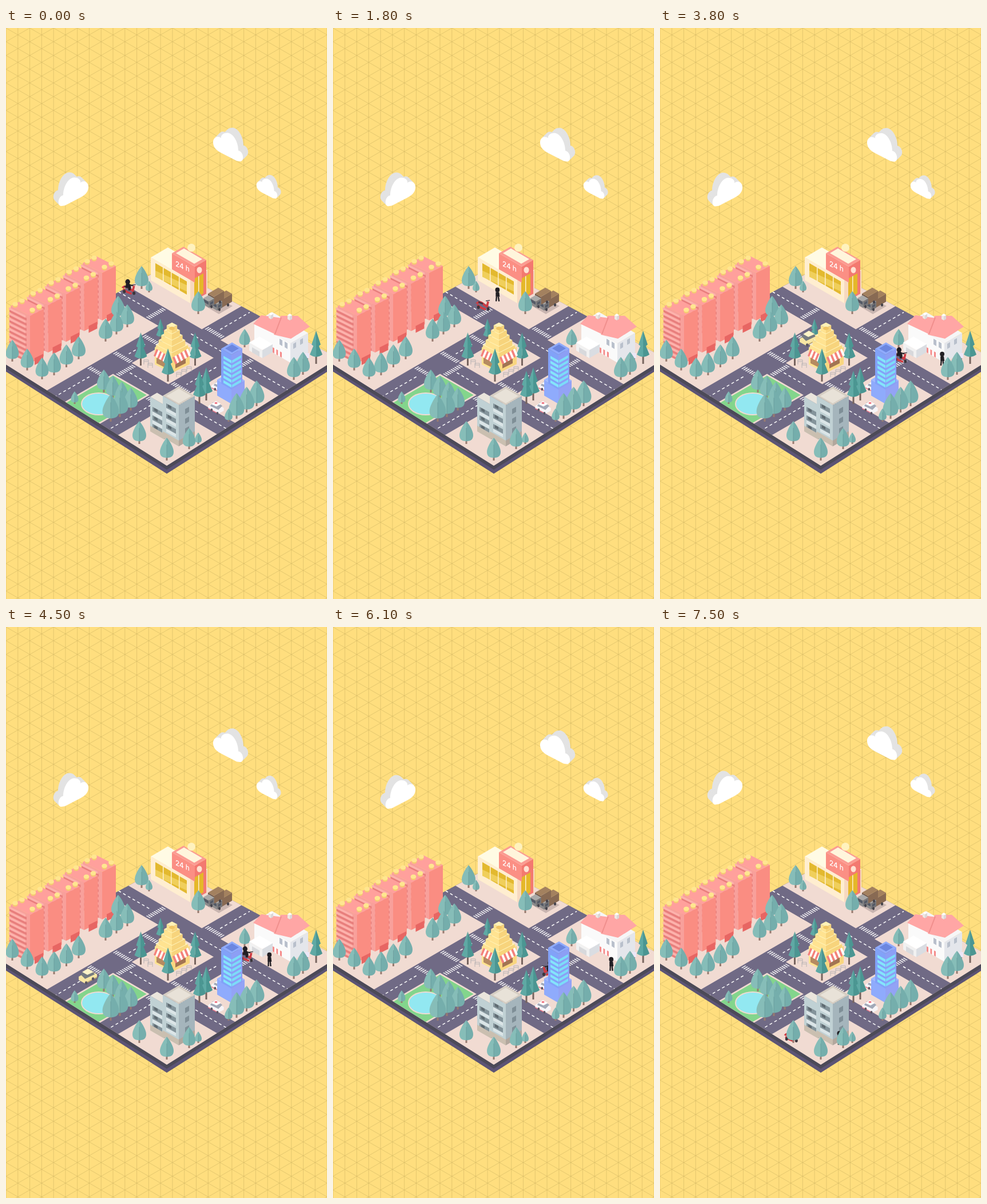
Recreate the animation shown at these times as an HTML page. Size 561 by 998 pixels, loop 7.6 s.

```html
<!DOCTYPE html>
<html lang="en">
<head>
<meta charset="utf-8">
<title>Isometric town</title>
<style>
html, body { margin: 0; width: 100%; height: 100%; overflow: hidden; background: #ffde7e; }
svg { display: block; width: 561px; height: 998px; }
</style>
</head>
<body>
<svg id="stage" viewBox="0 0 561 998" xmlns="http://www.w3.org/2000/svg"></svg>
<script>
const LOOP = 7600, STEP = 100, K = .58;
const stage = document.getElementById('stage');

// ---- shape helpers -------------------------------------------------
const poly = (fill, pts) => `<polygon fill="${fill}" points="${pts}"/>`;
const path = (d, fill, stroke = 'none', w = 1) => `<path d="${d}" fill="${fill}" stroke="${stroke}" stroke-width="${w}"/>`;
const oval = (x, y, rx, ry, fill) => `<ellipse cx="${x}" cy="${y}" rx="${rx}" ry="${ry}" fill="${fill}"/>`;
const rep = (n, f) => Array.from({ length: n }, (_, i) => f(i)).join('');
// Upright panel: top corner, horizontal run, slope, height
const wall = (x, y, run, slope, h, fill) =>
  poly(fill, [[x, y], [x + run, y + run * slope], [x + run, y + run * slope + h], [x, y + h]]);
// Solid block given by its front bottom corner
const box = (x, y, w, d, h, top, left, right, k = K) =>
  wall(x - w, y - h - w * k, w, k, h, left) + wall(x, y - h, d, -k, h, right) +
  poly(top, [[x, y - h], [x - w, y - h - w * k], [x - w + d, y - h - (w + d) * k], [x + d, y - h - d * k]]);

// Ground coordinates: a is constant along NW-SE, b along SW-NE
const pt = (a, b) => [(b - a) / (2 * K), (a + b) / 2];
const tile = (a0, a1, b0, b1, fill) => poly(fill, [pt(a0, b0), pt(a0, b1), pt(a1, b1), pt(a1, b0)]);

// ---- ground --------------------------------------------------------
// Road centre lines and half width
const R1 = 347, R2 = 477, S1 = 694, S2 = 806, NE = 744, HALF = 19;
const FAR = 1100;

function grid() {
  const rise = 12, run = 20.78;
  let d = '';
  for (let x = 0; x < 562; x += run) d += `M${x.toFixed(2)},0V998`;
  for (let y = -14 * 2 * rise; y < 1330; y += 2 * rise) d += `M0,${y}l${27 * run},${27 * rise}M0,${y}l${27 * run},${-27 * rise}`;
  return path(d, 'none', '#d8bd68', .7);
}

const lane = (a0, b0, a1, b1) =>
  `<path d="M${pt(a0, b0)}L${pt(a1, b1)}" stroke="#fff" stroke-width="1.5" stroke-dasharray="5 4.5" fill="none"/>`;

// Zebra stripes across a road at ground point (a, b)
const zebra = (a, b, da, db) => rep(9, i => {
  const s = (i - 4) * 3.8;
  const ca = a + s * da, cb = b + s * db, wa = da ? .9 : 4, wb = db ? .9 : 4;
  return tile(ca - wa, ca + wa, cb - wb, cb + wb, '#f4f2f4');
});
const zebraR = (a, b) => zebra(a, b, 1, 0);
const zebraS = (a, b) => zebra(a, b, 0, 1);

function ground() {
  const rim = (drop, fill) => poly(fill, [[-18, 577], [281, 765 + drop], [580, 577], [580, 577 + drop], [281, 765 + drop + 7], [-18, 577 + drop]]);
  const block = (a0, a1, b0, b1, fill = '#f1dbd2') =>
    tile(a0 + HALF, a1 - HALF, b0 + HALF, b1 - HALF, fill);
  return poly('#5c5475', '-18,577 281,765 580,577 580,589 281,779 -18,589') +
    poly('#4c4a58', '-18,577 281,765 580,577 580,584 281,772 -18,584') +
    '<clipPath id="land"><path d="M281,416L580,577L281,765L-18,577Z"/></clipPath><g clip-path="url(#land)">' +
    '<rect y="400" width="561" height="380" fill="#706a85"/>' +
    block(0, R1, 0, NE) + block(0, R1, NE, FAR) + block(R1, FAR, 0, S1) +
    block(R1, R2, S1, S2) + block(R1, R2, S2, FAR) +
    block(R2, FAR, S1, S2) + block(R2 + 3, FAR, S1 + 3, S2 - 3, '#83d58c') + block(R2, FAR, S2, FAR) +
    lane(R1, 575, R1, 638) + lane(R1, 722, R1, 812) + lane(R1, 840, R1, 930) +
    lane(310, NE, 250, NE) + lane(412, S1, 445, S1) + lane(525, S1, 610, S1) +
    lane(380, S2, 440, S2) + lane(512, S2, 610, S2) + lane(R2, 728, R2, 775) + lane(R2, 842, R2, 930) +
    zebraR(R1, 651) + zebraR(R1, 829) + zebraR(R2, 720) + zebraR(R2, 832) +
    zebraS(398, S1) + zebraS(457, S1) + zebraS(509, S1) + zebraS(321, NE) + zebraS(452, S2) + zebraS(503, S2) +
    oval(162, 657, 31, 20, '#f1dbd2') + oval(162, 657, 29, 18, '#92e8f1') + '</g>';
}

// ---- scenery -------------------------------------------------------
function bulbTree(x, base, h) {
  const w = h * .3, y = v => base - h * (1 - v);
  const side = (s, fill) => path(`M${x},${y(0)}C${x + s * w * .5},${y(.17)} ${x + s * w},${y(.45)} ${x + s * w},${y(.62)}C${x + s * w},${y(.84)} ${x + s * w * .5},${y(.88)} ${x},${y(.88)}Z`, fill);
  return path(`M${x},${y(.6)}V${base}`, 'none', '#987b70', 3) +
    side(-1, '#86bdb8') + side(1, '#75aeac') + path(`M${x},${y(.3)}V${y(.9)}`, 'none', '#679a9a', .8);
}
function coneTree(x, base, h) {
  const w = h * .19, y = v => base - h * (1 - v);
  const half = (v0, v1, r, fill) => path(`M${x},${y(v0)}L${x + r},${y(v1)}Q${x + r / 2},${y(v1 + .07)} ${x},${y(v1 + .07)}Z`, fill);
  const layer = (v0, v1, r) => half(v0, v1, -r, '#5fa9a4') + half(v0, v1, r, '#4b9692');
  return path(`M${x},${y(.7)}V${base}`, 'none', '#77645f', 3) + layer(.26, .72, w) + layer(0, .42, w * .72);
}

function apartment(i) {
  const f = 42 + 31.5 * i, t = 503 - 18.75 * i;
  const lamp = (dx, dy) => oval(f + dx, t + dy, 4.5, 3.8, '#f5cb72') + oval(f + dx, t + dy - 2.5, 4.8, 3.8, '#ffe690');
  return box(f, t + 83, 34, 24, 83, '#ffa09c', '#f8a09b', '#fa8d82', .5) +
    rep(9, j => wall(f - 36, t - 11 + j * 9, 30, .5, 4.5, '#e87f7d') + wall(f - 37, t - 15 + j * 9, 29, .5, 4, '#fdb2ac')) +
    wall(f + 8, t + 74, 15, -.5, 12, '#e76663') +
    lamp(-14, -24) + lamp(-26, -18) + lamp(16, -14) + lamp(4, -8);
}

function store() {
  return box(322, 481, 69, 30, 40, '#fffbe4', '#ffeed0', '#f7d9c0') +
    wall(261, 411, 55, K, 23, '#e3b92f') + wall(261, 424, 55, K * .8, 11, '#f0cf5b') +
    rep(3, i => wall(274 + i * 14, 418 + i * 8, 1.5, K, 25, '#fff0cf')) +
    wall(330, 417, 20, -K, 59, '#f37970') + wall(329, 438, 16, -K, 35, '#e5b829') + wall(336, 434, 1.5, -K, 35, '#ffeed0') +
    box(330, 445, 40, 20, 28, '#fb9b92', '#fb8f84', 'none') + box(329, 412, 32, 14, 0, '#fff5dc') +
    oval(324, 384, 7, 7, '#fff2be') + oval(338, 423, 4.5, 5.5, '#ffe1d1') +
    '<text transform="matrix(.9 .38 0 1 296 416)" font-family="Inter, Arial, sans-serif" font-size="13" font-weight="500" fill="#fff">24 h</text>';
}

// Facing SW: cab in front of a brown load
function truck(x, y) {
  return box(x, y, 10, 18, 14, '#a3815f', '#6f5646', '#886a53') +
    box(x - 8, y + 5, 10, 9, 11, '#a9a9a8', '#8b8a8b', '#777678') +
    wall(x - 17, y - 10, 8, K, 5, '#545a66') + wall(x - 6, y - 4, 5, -K, 4, '#545a66') +
    oval(x - 4, y + 3, 2, 2.8, '#45434b') + oval(x + 11, y - 5, 2, 2.8, '#45434b');
}

function house() {
  const roof = '#ffa6a5', glass = '#b9c0cc';
  const chimney = (x, y) => box(x, y, 4, 4, 7, '#fff', '#efe8e2', '#dcd7d7');
  return box(497, 585, 63, 31, 34, '#f6f6f7', '#fafafa', '#e4e6eb') +
    poly(roof, '432,517 446,502 482,507 470,535') + poly(roof, '468,536 480,503 510,503 531,522 498,543') +
    path('M470,535L481,506', 'none', '#f08f8d', 2) + chimney(463, 509) + chimney(496, 511) +
    box(448, 577, 23, 18, 14, '#fff', '#f1f1f1', '#dadde2') + wall(430, 558, 13, K, 9, '#d8d9dc') +
    rep(2, i => wall(478 + i * 9, 543 + i * 5, 5, K, 10, glass) + wall(502 + i * 12, 552 - i * 7, 5, -K, 9, glass)) +
    rep(5, i => wall(466 + i * 3.2, 558 + i * 1.8, 3.2, K, 9, i % 2 ? '#fff' : '#f58d8c'));
}
const sign = path('M527,572V584', 'none', '#77727f', 1.4) + wall(523, 568, 7, 0, 9, '#ece7f6');

function pagoda() {
  const awning = (x, y, run, s, out) => rep(8, i => {
    const d = run / 8, x0 = x + i * d, y0 = y + i * d * s;
    return poly(i % 2 ? '#fff' : '#f4817e', [[x0, y0], [x0 + d, y0 + d * s], [x0 + d + out, y0 + d * s + 12], [x0 + out, y0 + 12]]);
  });
  const chair = (x, y) => path(`M${x - 4},${y + 5}V${y - 3}H${x + 4}V${y + 5}M${x - 4},${y}H${x + 4}`, 'none', '#b8b3b4', 1);
  return box(290, 603, 30, 31, 30, '#ffeaa5', '#ffe391', '#f9d680', .5) +
    wall(263, 576, 20, .5, 10, '#b58a61') + wall(296, 584, 18, -.5, 11, '#a27453') +
    rep(5, i => box(290, 578 - i * 11, 28 - i * 4.7, 28 - i * 4.7, 10, '#fff2b6', '#ffe391', '#f7d47c', .5)) +
    oval(290, 525, 5, 3, '#f0c565') +
    awning(263, 561, 25, K, -5) + awning(291, 576, 27, -K, 5) +
    rep(2, i => chair(245 + i * 7, 583 + i * 6)) + rep(3, i => chair(302 + i * 9, 605 - i * 5));
}

function tower() {
  return box(394, 657, 25, 23, 28, '#9db8ff', '#8fabfc', '#93a3f5') +
    box(394, 632, 18, 19, 61, '#8fabfc', '#82a2f8', '#8c9ff5') + box(395, 567, 12, 12, 0, '#6c87e0') +
    rep(6, i => wall(380, 573 + i * 8.5, 14, K, 4.8, '#84e4fb') + wall(395, 581 + i * 8.5, 16, -K, 4.8, '#7cdcf8'));
}

function office() {
  const bay = (x, y) => wall(x, y, 17, .54, 13, '#84949b') + wall(x, y + 8, 17, .54, 6, '#dbe5e7') + wall(x + 3, y + 2, 6, .54, 5, '#5f6b72');
  const stone = '#cabfb0';
  return box(277, 719, 25, 12, 60, '#eae5dc', '#c0d1d4', '#9fb1b8') +
    box(302, 731, 28, 28, 72, '#d6cec3', '#c0d1d4', '#a5b5bc') + box(302, 656, 22, 22, 0, '#e8e2d8') +
    rep(3, i => bay(256, 662 + i * 15) + bay(280, 656 + i * 18) + wall(313, 666 + i * 17, 7, -K, 9, '#7f8f97')) +
    wall(252, 695, 25, K, 10, stone) + wall(274, 705, 28, K, 10, stone) + wall(302, 721, 28, -K, 10, '#b2a79d');
}

function car(body, roof, trim, glass) {
  return poly(body, '-16,-4 -4,-11 16,0 16,6 5,12 -16,1') + poly(trim, '-16,0 5,11 5,13 -16,2') +
    poly(glass, '-12,-4 -7,-11 2,-13 13,-4 5,4') + poly(roof, '-10,-8 0,-14 10,-8 1,-3') +
    oval(-9, 4, 2.2, 2.8, '#5b5762') + oval(3, 11, 2.2, 2.8, '#5b5762');
}
const whiteCar = (x, y) => `<g transform="translate(${x} ${y}) scale(.85)">${car('#f7f5f8', '#fff', '#e8798a', '#a3a9b8')}${oval(0, -10, 3, 2, '#ef7784')}</g>`;

// ---- moving figures ------------------------------------------------
const INK = '#211f24';
const scooterArt = path('M-11,-4C-9,-8 -2,-8 2,-2L7,1L9,-8M-10,-2L-3,3L5,6', 'none', '#cf3b42', 3.6) +
  path('M-8,-7L0,-4', 'none', '#46343d', 2.6) + path('M5,-9L12,-10', 'none', '#4b454d', 1.4) +
  oval(-8, 2, 2.5, 3, '#3a353b') + oval(9, 5, 2.5, 3, '#3a353b');
const riderArt = oval(-2, -15, 4.2, 4.4, INK) + path('M-5,-12L1,-12L4,-6L3,0L-1,0L-1,-5L-6,-4Z', INK) + path('M0,-10L7,-8', 'none', INK, 2);
const standArt = oval(0, -20, 3.9, 4.2, INK) + path('M-3,-16H3L4,-8H-3Z', INK);
const legs = t => {
  const s = 1.8 * Math.sin(t / 85);
  return path(`M-1.5,-8L${-1 - s},0M1.5,-8L${1.5 + s},0`, 'none', INK, 2.4);
};

// Screen position along timed ground points [t, a, b]; null outside their span
function at(keys, t) {
  if (t < keys[0][0] || t > keys[keys.length - 1][0]) return null;
  const i = Math.max(1, keys.findIndex(k => k[0] >= t));
  const [t0, a0, b0] = keys[i - 1], [t1, a1, b1] = keys[i];
  const p = (t - t0) / (t1 - t0);
  const [x, y] = pt(a0 + (a1 - a0) * p, b0 + (b1 - b0) * p);
  return { x, y, moving: a0 !== a1 || b0 !== b1, flip: b1 - a1 < b0 - a0 };
}

const LANE1 = R1 - 13, LANE2 = S2 + 15;
const riding = t => t < 500 || (t > 2500 && t < 7050);
const walker = keys => ({ keys, foot: 0, art: (t, p) => standArt + legs(p.moving ? t : 0) });
const actors = [
  { foot: 7, turn: true, art: t => scooterArt + (riding(t) ? riderArt : ''),
    keys: [[0, LANE1, 583], [400, LANE1, 638], [2700, LANE1, 638], [3800, LANE1, LANE2], [5900, LANE1, LANE2],
      [6900, 580, LANE2], [7050, 585, 851], [LOOP, 585, 851]] },
  { foot: 10, turn: true, art: () => car('#f8e6a4', '#fff4c8', '#c3ac72', '#767b80'),
    keys: [[2900, LANE1, 570], [3500, LANE1, S1], [4500, 528, S1], [4850, 596, S1]] },
  walker([[500, 332, 642], [1300, 305, 645], [1600, 305, 645], [2500, 332, 642]]),
  walker([[3800, 304, 876], [4500, 326, 860], [5000, 328, 832], [5300, 328, 832], [6100, 319, 883], [6400, 311, 884]]),
  walker([[6300, 529, 887], [LOOP, 550, 914]])
];

// ---- scene ---------------------------------------------------------
const items = [];
const add = (z, svg) => items.push({ z, svg });
const bulb = (x, base, h = 40) => add(base, bulbTree(x, base, h));
const cone = (x, base, h = 58) => add(base, coneTree(x, base, h));
// Evenly spaced trees
const row = (n, x, base, dx, dy, h) => { for (let i = 0; i < n; i++) bulb(x + i * dx, base + i * dy, h); };

for (let i = 0; i < 5; i++) add(566 - 19 * i, apartment(i));
add(470, store());
add(490, box(372, 500, 24, 24, 0, '#c9b5b0') + truck(377, 489) + truck(363, 484));
add(570, house());
add(584, sign);
add(603, pagoda());
add(632, whiteCar(373, 628));
add(657, tower());
add(675, whiteCar(367, 664));
add(705, office());

row(3, 11, 583, 26, 15.5, 38);
row(3, 84, 607, 21.5, -14);
row(3, 174, 548, 19, -12.5);
row(4, 171, 637, 15.7, 10.5);
row(2, 183, 688, 16, -8, 48);
row(2, 503, 615, 16, -9);
row(3, 403, 683, 17.5, -11, 45);
bulb(196, 508); bulb(237, 456); bulb(336, 500); bulb(417, 558, 32);
bulb(233, 727); bulb(281, 756); bulb(320, 736, 37);
bulb(250, 462, 20); bulb(336, 727, 20); bulb(389, 688, 23); bulb(120, 657, 22);
for (let i = -1; i <= 1; i++) cone(283 + 47.5 * i, 618 - 28 * Math.abs(i));
cone(270, 548, 40); cone(542, 587); cone(338, 657); cone(350, 651);
items.sort((p, q) => p.z - q.z);

const puff = 'M96,310C89,308 91,293 100,291C100,277 108,261 119,260C127,260 131,265 130,269C138,263 145,270 144,278C143,287 137,291 130,295L103,309Z';
const cloud = rep(6, i => `<g transform="translate(${i * 1.5 - 9} ${i * 1.5 - 9})">${path(puff, '#e3e3e3')}</g>`) + path(puff, '#fff');

stage.innerHTML = '<rect width="561" height="998" fill="#ffde7e"/>' + grid() + ground() +
  '<g id="town">' + items.map(o => `<g>${o.svg}</g>`).join('') + '</g>' +
  `<g id="sky">${cloud}<g transform="translate(506 -78) scale(-1 1)">${cloud}</g><g transform="translate(538.6 80) scale(-.7 .7)">${cloud}</g></g>`;

const town = document.getElementById('town'), sky = document.getElementById('sky');
items.forEach((o, i) => o.el = town.children[i]);
actors.forEach(o => {
  o.el = document.createElementNS('http://www.w3.org/2000/svg', 'g');
  town.append(o.el);
});

// Cloud bobbing: a few sine waves that close over one loop
function drift(t) {
  const w = t / LOOP * 2 * Math.PI;
  return 2.6 + 3.1 * Math.sin(w + 2.19) + 2.35 * Math.sin(2 * w - .24) + 2.8 * Math.sin(3 * w - 1.52) + 1.5 * Math.sin(4 * w - .43);
}

function draw(t) {
  sky.setAttribute('transform', `translate(0 ${drift(t).toFixed(2)})`);
  for (const o of actors) {
    const p = at(o.keys, t);
    o.el.style.display = p ? '' : 'none';
    if (!p) continue;
    o.el.innerHTML = o.art(t, p);
    o.el.setAttribute('transform', `translate(${p.x.toFixed(1)} ${p.y.toFixed(1)}) scale(${o.turn && p.flip ? -1 : 1} 1)`);
    const front = items.find(s => s.z > p.y + o.foot);
    town.insertBefore(o.el, front ? front.el : null);
  }
}

const start = performance.now();
let last = -1;
function tick() {
  const t = Math.floor((performance.now() - start) % LOOP / STEP) * STEP;
  if (t !== last) draw(last = t);
  requestAnimationFrame(tick);
}
tick();
</script>
</body>
</html>
```
